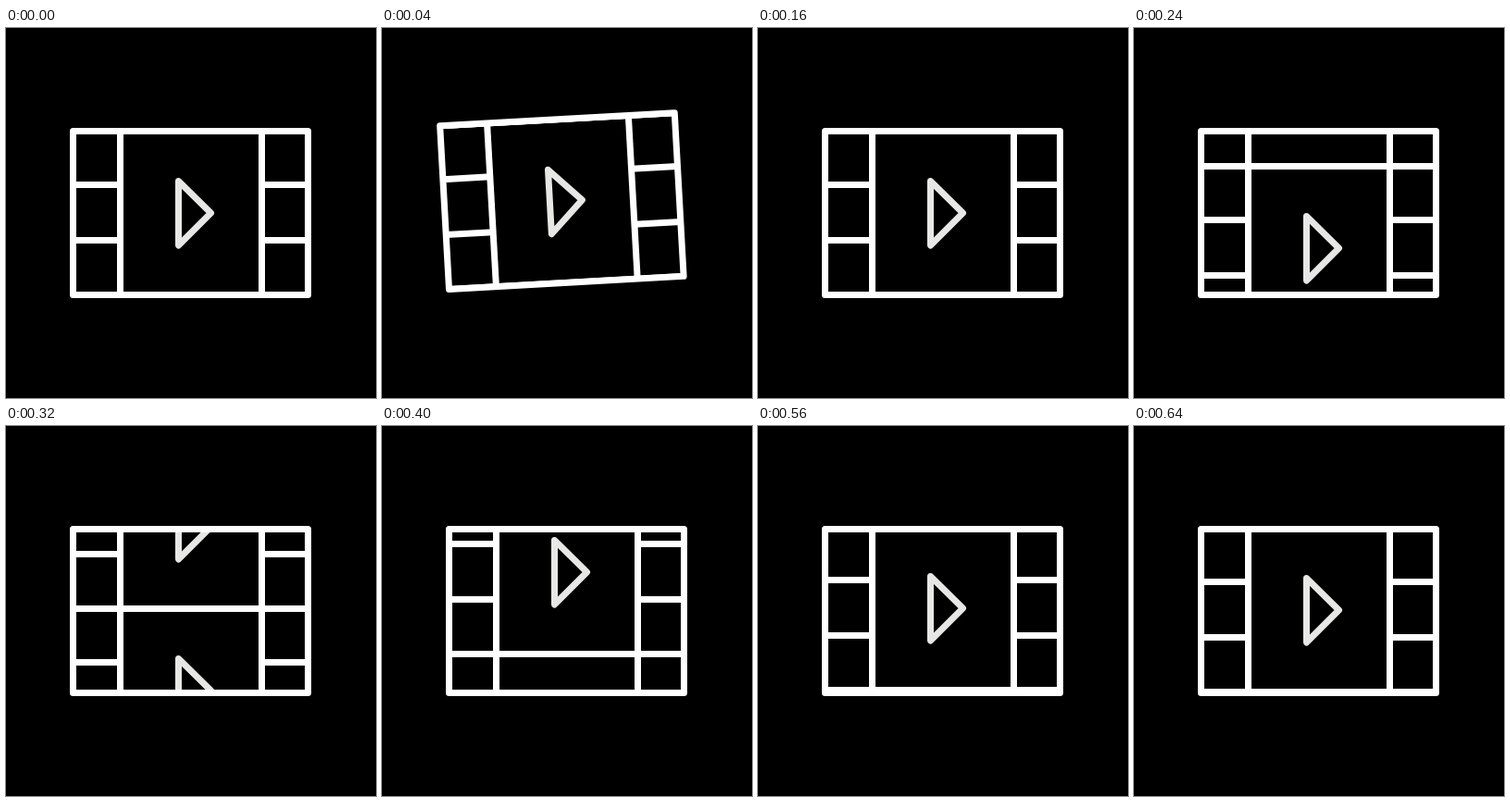
Write an HTML page with a canvas that moves like this. It is 400x400 px and loops after 0.72 s.

```html
<!DOCTYPE html>
<html>
<head>
<meta charset="utf-8">
<style>
  html, body { margin: 0; width: 100%; height: 100%; overflow: hidden; background: #000; }
  canvas { display: block; }
</style>
</head>
<body>
<canvas width="400" height="400"></canvas>
<script>
const ctx = document.querySelector('canvas').getContext('2d');
const LOOP = 720, STEP = 40, LAST = 640;
const LEFT = 72.5, RIGHT = 326.5, TOP = 111.5, BOTTOM = 288.5;
const RAIL_LEFT = 123.5, RAIL_RIGHT = 276.5;
const PERIOD = BOTTOM - TOP;
const HOP_END = 160, ROLL_END = 480, ROLL = 172.8;

// Tilt in degrees and lift in pixels while the strip hops on its lower left corner.
function hop(t) {
  const u = t / HOP_END;
  if (u >= 1) return { tilt: 0, lift: 0 };
  return { tilt: 3.6 * Math.pow(Math.sin(Math.PI * u), 0.35), lift: 32 * u * (1 - u) };
}

// Fast roll to the next cell, then a slow settle, in whole pixels.
function scroll(t) {
  if (t < HOP_END) return 0;
  if (t > ROLL_END) {
    return Math.round(ROLL + (PERIOD - ROLL) * (t - ROLL_END) / (LOOP - ROLL_END));
  }
  const u = (t - HOP_END) / (ROLL_END - HOP_END);
  return Math.round(ROLL * (0.68 * u + 0.32 * u * u * (3 - 2 * u)));
}

function line(x1, y1, x2, y2) {
  ctx.beginPath();
  ctx.moveTo(x1, y1);
  ctx.lineTo(x2, y2);
  ctx.stroke();
}

function cell(offset) {
  ctx.save();
  ctx.translate(0, offset);
  ctx.strokeStyle = '#fff';
  line(LEFT, TOP, RIGHT, TOP);
  line(LEFT, BOTTOM, RIGHT, BOTTOM);
  for (const y of [169.5, 229.5]) {
    line(LEFT, y, RAIL_LEFT, y);
    line(RAIL_RIGHT, y, RIGHT, y);
  }
  ctx.strokeStyle = '#e7e7e5';
  ctx.beginPath();
  ctx.moveTo(186.5, 165.5);
  ctx.lineTo(221.5, 200);
  ctx.lineTo(186.5, 235);
  ctx.closePath();
  ctx.stroke();
  ctx.restore();
}

function draw(t) {
  const { tilt, lift } = hop(t), offset = scroll(t);
  ctx.fillStyle = '#000';
  ctx.fillRect(0, 0, 400, 400);
  ctx.save();
  ctx.translate(LEFT, BOTTOM - lift);
  ctx.rotate(-tilt * Math.PI / 180);
  ctx.translate(-LEFT, -BOTTOM);
  ctx.lineWidth = 7;
  ctx.lineJoin = 'round';

  ctx.save();
  ctx.beginPath();
  ctx.rect(LEFT, TOP, RIGHT - LEFT, BOTTOM - TOP);
  ctx.clip();
  cell(offset);
  cell(offset - PERIOD);
  ctx.restore();

  ctx.strokeStyle = '#fff';
  ctx.strokeRect(LEFT, TOP, RIGHT - LEFT, BOTTOM - TOP);
  for (const x of [RAIL_LEFT, RAIL_RIGHT]) line(x, TOP, x, BOTTOM);
  ctx.restore();
}

function tick() {
  const t = performance.now() % LOOP;
  draw(Math.min(LAST, Math.floor(t / STEP) * STEP));
  requestAnimationFrame(tick);
}
tick();
</script>
</body>
</html>
```
